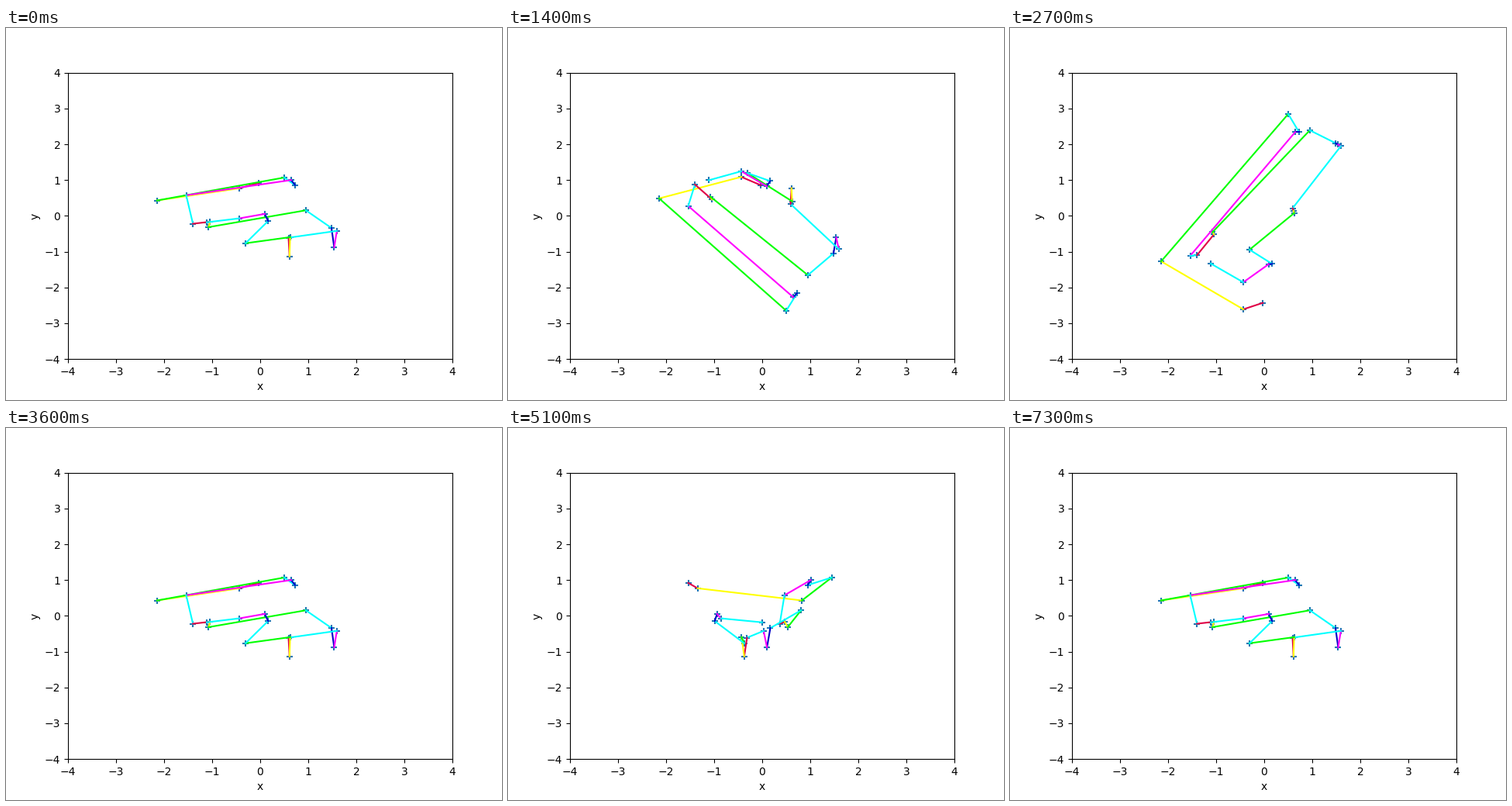
A matplotlib script for the animation above (7400 ms loop, 640x480 px).

```python
import numpy as np
import matplotlib.pyplot as plt
from matplotlib.animation import FuncAnimation

STEP = 10                    # degrees per frame
TURN = 360 // STEP + 1       # frames in one full turn, both ends included
DRIFT = 0.07                 # sideways shift between heights at one stop
COLORS = ["#e00046", "yellow", "lime", "cyan", "#0000c8", "magenta", "cyan"]

# Each stop: place on the floor (x + z j), then the heights y visited there.
STOPS = [
    (-0.03 - 2.43j, 0.92), (-0.435 - 2.61j, 0.77), (-2.145 - 1.27j, 0.43),
    (0.50 + 2.845j, 1.07), (0.725 + 2.34j, 0.86), (0.645 + 2.34j, 1.0),
    (-1.54 - 1.115j, 0.575), (-1.40 - 1.10j, -0.22),
    (-1.06 - 0.485j, -0.165, -0.315),
    (0.95 + 2.39j, 0.155),
    (1.54 + 1.99j, -0.34, -0.88, -0.42),
    (0.61 + 0.145j, -0.61, -1.13, -0.595),
    (-0.305 - 0.945j, -0.765),
    (0.13 - 1.345j, -0.145, 0.055),
    (-0.435 - 1.855j, -0.07),
]


def build_chain():
    """Climb at each stop, drifting clockwise; the end centres the chain."""
    pts = []
    for spot, *heights in STOPS:
        for k, y in enumerate(heights):
            arc = DRIFT * (k - (len(heights) - 1) / 2)
            p = spot * np.exp(-1j * arc / abs(spot))
            pts.append((p.real, y, p.imag))
    return np.vstack([pts, -np.sum(pts, axis=0)])


def project(frame):
    """Turn the chain once about the x axis, then once about the y axis."""
    x, y, z = chain.T
    axis, step = divmod(frame, TURN)
    a = np.radians(step * STEP)
    if axis == 0:
        y = y * np.cos(a) - z * np.sin(a)
    else:
        x = x * np.cos(a) + z * np.sin(a)
    return np.column_stack([x, y])


def update(frame):
    pts = project(frame)
    marks.set_offsets(pts)
    for i, bond in enumerate(bonds):
        bond.set_data(pts[i:i + 2, 0], pts[i:i + 2, 1])
    return [marks, *bonds]


chain = build_chain()

fig, ax = plt.subplots(figsize=(6.4, 4.8), dpi=100)
ax.set(xlim=(-4, 4), ylim=(-4, 4), xlabel="x", ylabel="y")
marks = ax.scatter(chain[:, 0], chain[:, 1], marker="+", color="C0")
bonds = [ax.plot([], [], color=COLORS[i % len(COLORS)])[0]
         for i in range(len(chain) - 1)]

anim = FuncAnimation(fig, update, frames=2 * TURN, interval=100,
                     repeat=True, repeat_delay=0)
plt.show()
```
